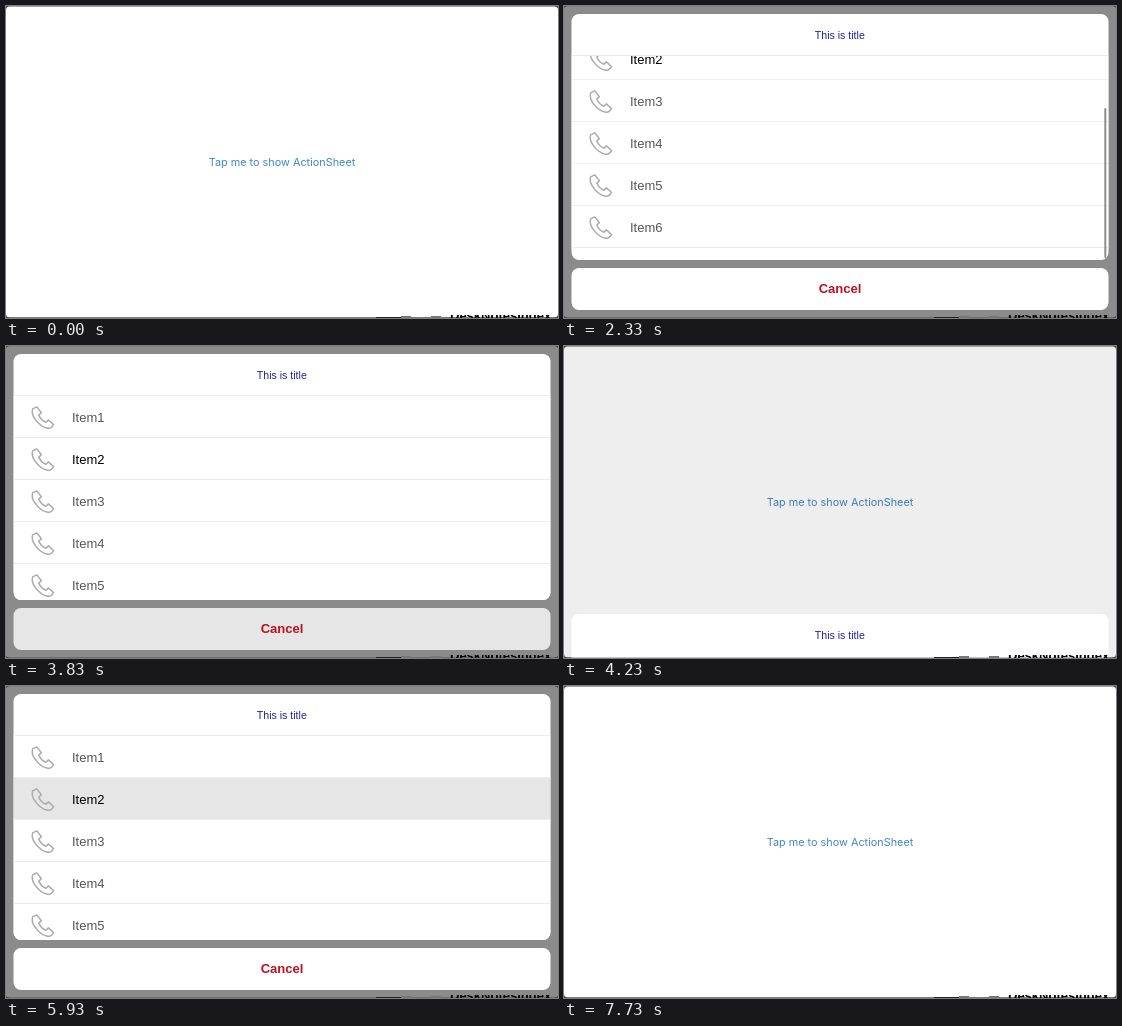
Write an HTML page that moves like this. It is 552 by 312 pixels and loops after 7810 ms.

```html
<!DOCTYPE html>
<html lang="en">
<head>
<meta charset="utf-8">
<title>Action sheet</title>
<style>
html, body { margin: 0; width: 100%; height: 100%; overflow: hidden; background: #fff; }
svg { display: block; width: 552px; height: 312px; }
text { font-family: "Liberation Sans", Arial, sans-serif; }
.mid { text-anchor: middle; }
.rule { stroke: #ededed; stroke-width: 1; }
</style>
</head>
<body>
<svg viewBox="0 0 552 312">
  <defs>
    <clipPath id="win"><rect y="0.5" width="552" height="310.7" rx="3.5"/></clipPath>
    <clipPath id="card"><rect x="7.5" y="8" width="537" height="246" rx="7.5"/></clipPath>
    <clipPath id="view"><rect x="7.5" y="50" width="537" height="204"/></clipPath>
    <clipPath id="edge"><rect y="309" width="552" height="3"/></clipPath>
    <path id="phone" fill="none" stroke="#ababab" stroke-width="1.5" stroke-linejoin="round"
      d="M5.8 1.4L1.6 3.4C.6 6.5 1.5 10 4 13.6C7.5 18.5 12 22 17 22.8C19 23 20.8 22.4 22.6 19L17.4 14.4L15 16.8C12 15.6 9 12.5 7.8 9.6L10.4 7.2Z"/>
  </defs>
  <rect width="552" height="312" fill="#4c4c4c"/>
  <g clip-path="url(#win)">
    <rect width="552" height="312" fill="#fff"/>
    <text class="mid" x="276" y="159.8" fill="#4385c6" style="font:10.85px Inter,sans-serif">Tap me to show ActionSheet</text>
    <rect id="dim" width="552" height="312"/>
    <g id="panel">
      <g clip-path="url(#card)">
        <rect x="7" y="8" width="538" height="246" fill="#fff"/>
        <g clip-path="url(#view)"><g id="rows"></g></g>
        <path class="rule" d="M7.5 49.5H544.5"/>
        <text class="mid" x="275.8" y="33" font-size="10.6" fill="#22229a">This is title</text>
        <rect id="bar" x="540.3" width="2" rx="1" fill="#8e8e8e"/>
      </g>
    </g>
    <g id="cancel">
      <rect id="button" x="7.5" y="262" width="537" height="42" rx="7.5"/>
      <text class="mid" x="276" y="287.3" font-size="13" font-weight="700" fill="#bd1020">Cancel</text>
    </g>
  </g>
  <g clip-path="url(#edge)">
    <path d="M370 311.5H395" stroke="#222"/>
    <path d="M395 311H405M425 311H435" stroke="#777" stroke-width="2"/>
    <text x="444" y="314" font-size="13" font-weight="700">DeskNotesIndex</text>
  </g>
</svg>
<script>
const LOOP = 7810, ROW = 42, COUNT = 6, VIEW = 204;
const END = ROW * COUNT - VIEW;
const $ = id => document.getElementById(id);
const clamp = x => Math.min(1, Math.max(0, x));
const ramp = (t, a, b) => clamp((t - a) / (b - a));
const smooth = x => x * x * (3 - 2 * x);
const shift = (el, y) => el.setAttribute("transform", `translate(0 ${y.toFixed(2)})`);

for (let i = 0; i < COUNT; i++) {
  const y = 50 + i * ROW;
  $("rows").innerHTML += `<rect id="row${i}" x="7" y="${y}" width="538" height="${ROW}" fill="#fff"/>
    <use href="#phone" x="25" y="${y + 9.5}"/>
    <text x="66" y="${y + 25.7}" font-size="13" fill="${i === 1 ? "#000" : "#555"}">Item${i + 1}</text>
    <path class="rule" d="M7.5 ${y + ROW - 0.5}H544.5"/>`;
}

// Underdamped step response, 0 to 1
function spring(ms) {
  if (ms <= 0) return 0;
  const s = ms / 1000, a = 15.5, w = 21;
  return s > 0.6 ? 1 : 1 - Math.exp(-a * s) * (Math.cos(w * s) + a / w * Math.sin(w * s));
}

// Drag past the end, settle, drag back past the top, settle
function scrollAt(t) {
  const over = 15;
  const to = (a, b, t0, t1) => a + (b - a) * smooth(ramp(t, t0, t1));
  if (t < 2390) return to(0, END + over, 1940, 2390);
  if (t < 2750) return to(END + over, END, 2390, 2750);
  if (t < 3130) return to(END, -over, 2750, 3130);
  return to(-over, 0, 3130, 3480);
}

function draw(t) {
  const second = t >= 4600;
  const open = second ? 4930 : 830;
  const close = second ? 6003 : 4003;
  const stay = 1 - smooth(ramp(t, close, close + 300));
  const fade = smooth(ramp(t, open, open + 400)) * stay;
  shift($("panel"), 304 * (1 - spring(t - open) * stay));
  shift($("cancel"), 50 * (1 - spring(t - open - 200) * stay));
  $("dim").setAttribute("fill-opacity", 0.455 * fade);

  const pos = scrollAt(t);
  shift($("rows"), -pos);
  const over = Math.max(0, -pos, pos - END);
  const len = 162 - over;
  $("bar").setAttribute("y", 52 + clamp(pos / END) * (200 - len));
  $("bar").setAttribute("height", len);
  $("bar").setAttribute("opacity", ramp(t, 1950, 2000) * (1 - ramp(t, 3540, 3630)));

  $("button").setAttribute("fill", t >= 3830 && t < 3990 ? "#e6e6e6" : "#fff");
  $("row1").setAttribute("fill", t >= 5930 && t < 6310 ? "#e6e6e6" : "#fff");
}

function tick() {
  draw(performance.now() % LOOP);
  requestAnimationFrame(tick);
}
tick();
</script>
</body>
</html>
```
